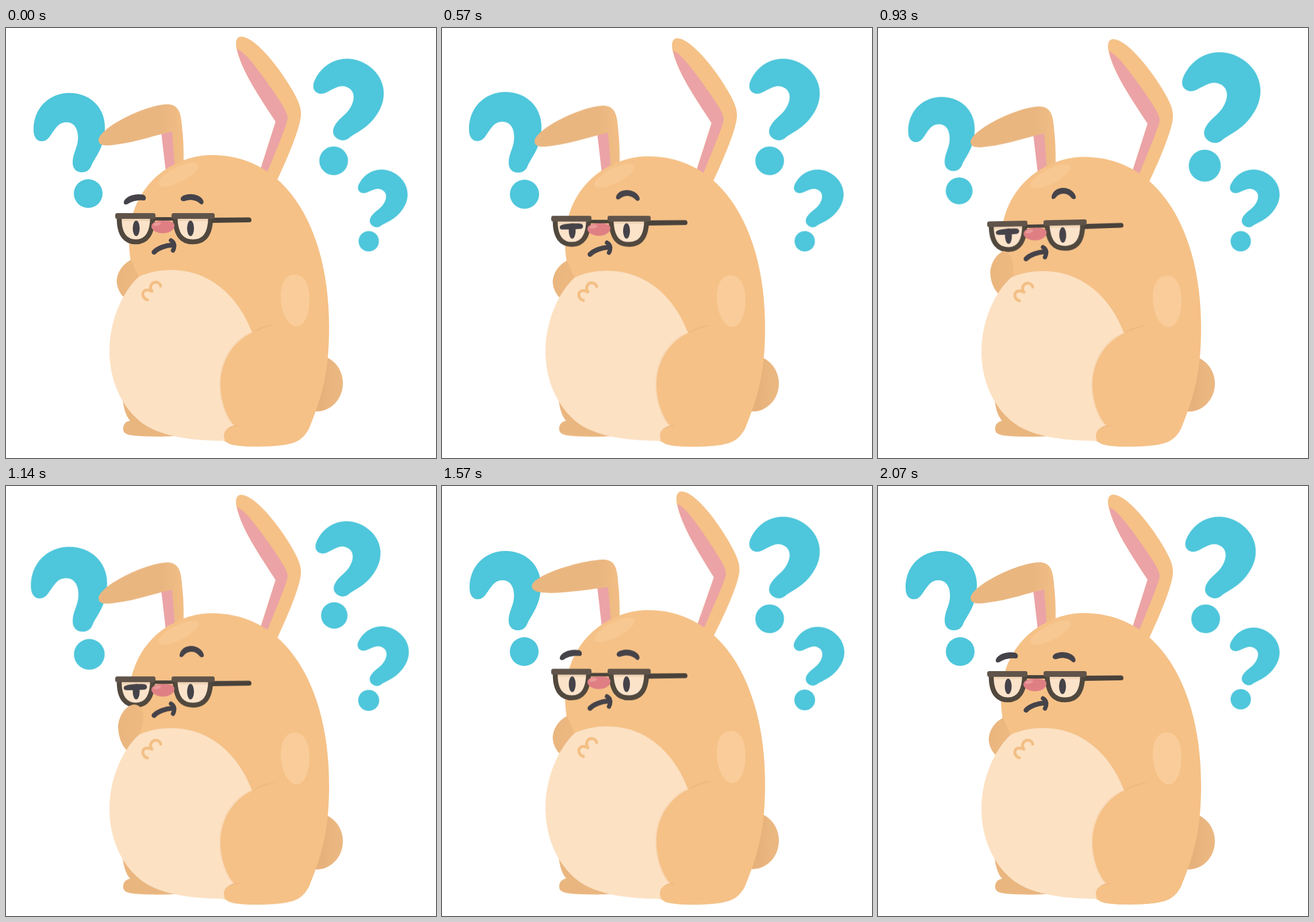
Animation of 748 by 748 pixels, one loop 2.14 s. Source, as an HTML page:

```html
<!DOCTYPE html>
<html lang="en">
<head>
<meta charset="utf-8">
<title>Puzzled rabbit</title>
<style>
html, body { margin: 0; width: 100%; height: 100%; overflow: hidden; background: #fff; }
svg { display: block; width: 100vw; height: 100vh; }

.mark, .rabbit, .ear, .flap, .arm, .specs, .mouth, .brow-l, .brow-r {
  animation: 2140ms linear infinite;
}
.mark { fill: #4ec6db; animation-name: pulse; }
.m1 { transform-origin: 115px 217px; animation-delay: 549ms; }
.m2 { transform-origin: 584px 155px; animation-delay: 775ms; }
.m3 { transform-origin: 634px 312px; animation-delay: 1098ms; }
.rabbit { transform-origin: 374px 728px; animation-name: breathe; }
.ear { transform-origin: 457px 255px; animation-name: ear; }
.flap { animation-name: flap; }
.arm { animation-name: arm; }
.specs { transform-origin: 308px 330px; animation-name: specs; }
.mouth { animation-name: mouth; }
.brow-l { animation-name: brow-l; }
.brow-r { animation-name: brow-r; }

.fur { fill: #f5c187; }
.shade { fill: #eab67f; }
.pink { fill: #eba3a6; }
.glow { fill: #f9cc99; }
.ink { fill: #454349; }
.lens { fill: #fbe3ca; }
.rim { fill: none; stroke: #51483e; stroke-width: 8.5; }
.line { fill: none; stroke-linecap: round; stroke-linejoin: round; }

@keyframes pulse {
  0% { transform: scale(1); }
  4.3% { transform: scale(1.07); }
  7.7% { transform: scale(1.12); }
  11% { transform: scale(1.095); }
  13% { transform: scale(.98); }
  15.7% { transform: scale(.895); }
  17.5% { transform: scale(.93); }
  22% { transform: scale(1.02); }
  26% { transform: scale(1.075); }
  28.3% { transform: scale(1.067); }
  32% { transform: scale(1.035); }
  36.7%, 100% { transform: scale(1); }
}
@keyframes breathe {
  0%, 6.7% { transform: scaleY(1); }
  26.7% { transform: scaleY(.996); }
  36.7% { transform: scaleY(.993); }
  45% { transform: scaleY(.994); }
  53.3% { transform: scaleY(.9995); }
  60% { transform: scaleY(1.0005); }
  63.3% { transform: scaleY(1.01); }
  66.7% { transform: scaleY(1.0168); }
  70% { transform: scaleY(1.0185); }
  73.3% { transform: scaleY(1.01); }
  76.7% { transform: scaleY(1.001); }
  80% { transform: scaleY(.9985); }
  90%, 100% { transform: scaleY(1); }
}
@keyframes ear {
  0%, 60% { transform: translateX(0) rotate(0deg) scaleY(1); }
  66.7%, 70% { transform: translateX(2.5px) rotate(2.7deg) scaleY(.98); }
  78%, 100% { transform: translateX(0) rotate(0deg) scaleY(1); }
}
@keyframes flap {
  0%, 60% { d: path("M161 195C163 172 250 130 285 133C304 136 305 155 307 180C309 200 309 215 309 240L294 245L289 180C260 186 230 198 190 203C170 206 161 204 161 195Z"); }
  66.7%, 70% { d: path("M153 167C158 150 250 134 285 135C304 137 305 155 307 180C309 200 309 215 309 240L294 245L289 182C255 184 220 185 190 183C168 181 152 178 153 167Z"); }
  78%, 100% { d: path("M161 195C163 172 250 130 285 133C304 136 305 155 307 180C309 200 309 215 309 240L294 245L289 180C260 186 230 198 190 203C170 206 161 204 161 195Z"); }
}
@keyframes arm {
  0%, 30% { d: path("M218 403C200 412 191 430 193 445C195 458 202 466 207 470L240 470L240 445C228 430 222 415 218 403Z"); }
  36.7% { d: path("M216 398C203 405 195 422 196 437C198 450 203 458 208 462L240 462L236 440C228 430 222 412 216 398Z"); }
  46.7%, 60% { d: path("M222 380C207 382 195 402 195 420C196 440 203 452 210 460L240 460L232 433C242 412 244 380 222 380Z"); }
  66.7% { d: path("M214 394C200 394 195 410 195 425C196 445 203 455 209 462L240 462L234 437C227 425 222 405 214 394Z"); }
  73.3%, 100% { d: path("M218 403C200 412 191 430 193 445C195 458 202 466 207 470L240 470L240 445C228 430 222 415 218 403Z"); }
}
@keyframes specs {
  0%, 10% { transform: translateY(0) rotate(0deg); }
  26.7% { transform: translateY(3px) rotate(0deg); }
  36.7% { transform: translateY(9.5px) rotate(-2.2deg); }
  45% { transform: translateY(9.5px) rotate(-1deg); }
  53.3%, 60% { transform: translateY(9px) rotate(0deg); }
  66.7% { transform: translateY(2.2px) rotate(0deg); }
  73.3%, 100% { transform: translateY(0) rotate(0deg); }
}
@keyframes mouth {
  0%, 10% { transform: translateY(0); }
  26.7% { transform: translateY(2.5px); }
  36.7% { transform: translateY(10px); }
  53.3% { transform: translateY(9px); }
  60% { transform: translateY(8px); }
  66.7% { transform: translateY(-1px); }
  73.3%, 100% { transform: translateY(0); }
}
@keyframes brow-l {
  0%, 12% { d: path("M205 302C208 293 224 287 239 290C245 292 244 300 240 300C228 299 220 301 212 306C208 308 204 307 205 302Z"); }
  23%, 60% { d: path("M205 341C206 336 224 335 240 335.5C247 336 247 344 241 345C230 346 222 346 212 346C207 346 204 345 205 341Z"); }
  66.7%, 100% { d: path("M205 302C208 293 224 287 239 290C245 292 244 300 240 300C228 299 220 301 212 306C208 308 204 307 205 302Z"); }
}
@keyframes brow-r {
  0%, 13.3% { transform: none; d: path("M304 296C306 291 314 289 321 289C331 289 340 293 343 300C345 306 341 308 338 306C333 301 328 300 322 299C317 299 314 300 311 301C307 302 303 300 304 296Z"); }
  36.7% { transform: translateY(-4.5px); d: path("M302 293C304 283 313 278 322 278C333 278 342 285 344 293C345 298 340 299 337 296C333 291 328 288 323 288C317 288 312 291 309 295C306 299 301 298 302 293Z"); }
  53.3%, 60% { transform: translateY(0); d: path("M302 293C304 283 313 278 322 278C333 278 342 285 344 293C345 298 340 299 337 296C333 291 328 288 323 288C317 288 312 291 309 295C306 299 301 298 302 293Z"); }
  66.7% { transform: translateY(4px); d: path("M304 296C306 291 314 289 321 289C331 289 340 293 343 300C345 306 341 308 338 306C333 301 328 300 322 299C317 299 314 300 311 301C307 302 303 300 304 296Z"); }
  73.3%, 100% { transform: none; d: path("M304 296C306 291 314 289 321 289C331 289 340 293 343 300C345 306 341 308 338 306C333 301 328 300 322 299C317 299 314 300 311 301C307 302 303 300 304 296Z"); }
}
</style>
</head>
<body>
<svg viewBox="0 0 748 748">
  <defs>
    <!-- question mark with its dot at the origin -->
    <g id="q">
      <path transform="translate(-143 -288)" d="M48 178C47 140 75 113 110 113C148 113 172 140 172 172C172 206 157 222 149 238C146 247 140 251 132 251C122 251 115 244 116 232C117 215 127 205 125 186C124 172 116 164 106 164C92 164 88 172 78 186C73 194 68 197 62 197C54 197 48 190 48 178Z"/>
      <circle r="25"/>
    </g>
    <linearGradient id="flapFill" gradientUnits="userSpaceOnUse" x1="270" x2="304" y1="0" y2="0">
      <stop stop-color="#eab680"/><stop offset="1" stop-color="#f1bd85"/>
    </linearGradient>
    <linearGradient id="armFill" gradientUnits="userSpaceOnUse" x1="195" x2="242" y1="0" y2="0">
      <stop stop-color="#eab67f"/><stop offset="1" stop-color="#efba81"/>
    </linearGradient>
    <linearGradient id="tailFill" gradientUnits="userSpaceOnUse" x1="550" x2="572" y1="0" y2="0">
      <stop stop-color="#e7b17b"/><stop offset="1" stop-color="#ebb781"/>
    </linearGradient>
  </defs>

  <g class="mark m1"><use href="#q" transform="translate(143 288)"/></g>
  <g class="mark m2"><use href="#q" transform="translate(570 231) rotate(28)"/></g>
  <g class="mark m3"><use href="#q" transform="translate(631 371) rotate(32) scale(.71)"/></g>

  <g class="rabbit">
    <ellipse cx="540" cy="618" rx="46" ry="49" fill="url(#tailFill)"/>

    <g class="ear">
      <path class="fur" d="M443 244L469 163C440 118 410 75 401 36C398 20 403 14 410 15C432 16 470 62 492 98C508 124 514 138 513 152C512 172 492 222 471 266L458 280Z"/>
      <path class="pink" d="M402 37C416 41 440 74 465 110C482 135 489 146 490 156C490 165 475 200 455 250L440 255L469 163C440 118 410 75 402 37Z"/>
    </g>
    <path class="pink" d="M270 181L291 176L297 242L278 250Z"/>
    <path class="flap" fill="url(#flapFill)"/>

    <path class="shade" d="M202 640C205 665 209 675 216 683C206 685 203 692 204 699C205 707 215 709 235 710C255 711 275 711 292 710L300 680Z"/>
    <path class="fur" d="M358 221C300 221 222 262 214 360C213 390 218 420 226 440L300 690L400 726C420 729 460 729 490 724C510 721 520 710 527 697C550 640 562 600 562 520C562 352 490 221 358 221Z"/>
    <ellipse cx="300" cy="255" rx="39" ry="13" transform="rotate(-27 300 255)" fill="#f7c892"/>
    <path class="glow" d="M500 429C518 427 528 445 528 472C528 500 518 519 506 519C490 519 478 495 478 467C478 445 486 430 500 429Z"/>

    <path class="brow-r ink"/>
    <g class="specs">
      <path class="lens" d="M197 328C196 362 210 372 226 372C243 372 255 360 255 328Z"/>
      <path class="lens" d="M294 328C295 362 307 372 325 372C344 372 356 360 356 328Z"/>
      <path fill="#f1d5b7" d="M198 330H254V336H198ZM295 330H355V336H295Z"/>
      <ellipse class="ink" cx="226.500" cy="348.500" rx="6" ry="13.500"/>
      <ellipse class="ink" cx="321" cy="348.500" rx="6" ry="13.500"/>
      <path class="brow-l ink"/>
      <path class="rim" d="M197 328C196 362 210 372 226 372C243 372 255 360 255 328M294 328C295 362 307 372 325 372C344 372 356 360 356 328"/>
      <path fill="#49423b" d="M256 329H292V335H256ZM358 330L423 329.500Q427 330 427 334Q427 338 423 338L358 339Z"/>
      <rect x="190" y="322" width="70" height="10" rx="3.500" fill="#60544a"/>
      <rect x="288" y="322" width="75" height="10" rx="3.500" fill="#60544a"/>
      <path fill="#df7f84" d="M253 344C254 338 263 335 275 335C287 335 293 338 293 344C293 351 284 357 273 357C262 357 252 351 253 344Z"/>
      <ellipse cx="263" cy="341" rx="7" ry="3" fill="#e99a9a" transform="rotate(-12 263 341)"/>
    </g>
    <g class="mouth line" stroke="#454349">
      <path stroke-width="8.500" d="M257.500 390C264 383 278 378 289 377.500"/>
      <path stroke-width="7.500" d="M287 369.500C293.500 373 294 380 290.500 387"/>
    </g>

    <path class="arm" fill="url(#armFill)"/>
    <path fill="#fce1c3" d="M287 421C365 421 410 480 428 530L440 620L400 718C332 719 260 714 224 676C195 647 180 605 180 562C180 500 210 450 232 432C250 424 270 421 287 421Z"/>
    <path class="line" stroke="#f3bf85" stroke-width="5" d="M246 473C237 470 235 459 243 456C249 455 252 457 254 458C248 450 254 442 261 442C266 443 269 446 269 449"/>

    <path fill="#f9d9b6" d="M428 528C391 543 371 580 371 620C371 650 382 678 395 692L440 620Z"/>
    <path class="fur" d="M428 530C395 545 373 580 373 620C373 650 385 680 398 692C386 693 379 701 379 709C379 719 386 725 400 726C430 730 470 728 490 724L520 620L470 520Z"/>
    <path fill="#eeb980" d="M428 530C440 520 456 516 470 516C456 519 442 524 428 530Z"/>
    <path class="line" stroke="#eeb980" stroke-width="2" d="M390 695C394 693 399 691 404 692"/>
  </g>
</svg>
<script>
// Hold each pose for one thirtieth of the loop.
const step = 2140 / 30;
const start = performance.now();
const parts = document.getAnimations();
parts.forEach(a => a.pause());

function draw() {
  const time = Math.floor((performance.now() - start + 5) / step) * step;
  parts.forEach(a => { a.currentTime = time; });
  requestAnimationFrame(draw);
}
draw();
</script>
</body>
</html>
```
